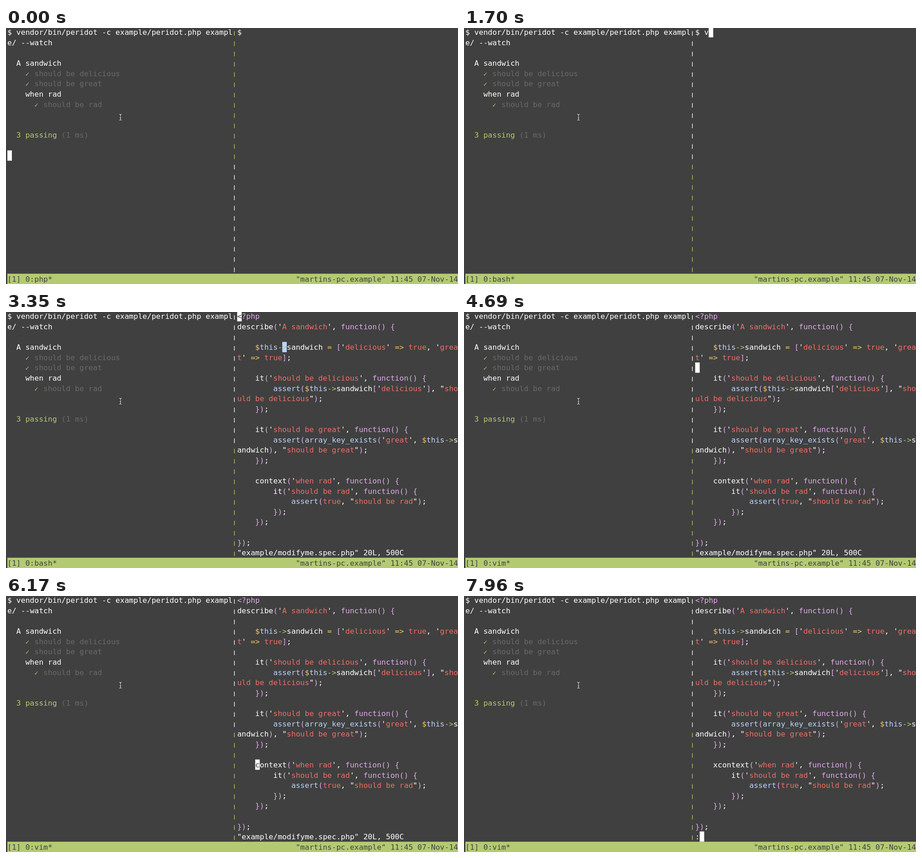
Recreate the animation shown at these times as an HTML page with a canvas. Size 995 by 563 pixels, loop 8000 ms.

```html
<!DOCTYPE html>
<html lang="en">
<head>
<meta charset="utf-8">
<title>Terminal</title>
<style>
html, body { margin: 0; width: 100%; height: 100%; overflow: hidden; background: #404040; }
canvas { display: block; }
</style>
</head>
<body>
<canvas id="stage" width="995" height="563"></canvas>
<script>
const ctx = document.getElementById('stage').getContext('2d');
const LOOP = 8000, CELL_W = 9.92, CELL_H = 22.6, LEFT = 3, PANE = 51, PANE_COLS = 49;
const BG = '#404040', WHITE = '#ffffff', GREY = '#696969', GREEN = '#b4ca72',
  RED = '#ee6d66', PINK = '#dfabe8', BLUE = '#bbd5fc', YELLOW = '#f6c762';
const FONT = '"DejaVu Sans Mono", "Liberation Mono", monospace';

const specCode = `<?php
describe('A sandwich', function() {

    $this->sandwich = ['delicious' => true, 'great' => true];

    it('should be delicious', function() {
        assert($this->sandwich['delicious'], "should be delicious");
    });

    it('should be great', function() {
        assert(array_key_exists('great', $this->sandwich), "should be great");
    });

    context('when rad', function() {
        it('should be rad', function() {
            assert(true, "should be rad");
        });
    });

});`;

// Each rule colours one kind of token; strings keep white quotes.
const rules = [
  [/^('[^']*'|"[^"]*")/, RED],
  [/^(<\?php|function|[()[\]{}])/, PINK],
  [/^->/, GREEN],
  [/^(=>?|\$)/, YELLOW],
  [/^(this|assert|array_key_exists)\b/, BLUE],
  [/^true\b/, RED],
  [/^(\w+|.)/, WHITE]
];

// Time, row and column of the text cursor.
const cursorSteps = [
  [0, 12, 0], [500, 0, 53], [1700, 0, 54], [1850, 0, 57], [2150, 0, 60], [2300, 0, 65],
  [2600, 0, 66], [2750, 0, 83], [3350, 0, 51], [3950, 1, 51], [4100, 2, 51],
  [4690, 5, 51], [4840, 7, 51], [4990, 10, 51], [5130, 12, 51], [5280, 15, 51], [5430, 16, 51],
  [5730, 16, 52], [5880, 16, 53], [6030, 16, 54], [6170, 16, 55], [7060, 16, 56], [7960, 23, 52]
];
const typedSteps = [
  [0, ''], [1700, 'v'], [1850, 'vim '], [2150, 'vim exa'], [2300, 'vim example/'],
  [2600, 'vim example/m'], [2750, 'vim example/modifyme.spec.php ']
];
const processSteps = [[0, 'php'], [1100, 'bash'], [3500, 'vim']];
const messageSteps = [
  [3350, '"example/modifyme.spec.php" 20L, 500C'], [6760, '-- INSERT --'], [7960, ':']
];

const current = (steps, t) => steps.filter(s => s[0] <= t).pop();
const cellX = col => LEFT + col * CELL_W;
const cellY = row => Math.max(0, row * CELL_H - 2);

let cursor;

function fillCell(row, col, color) {
  ctx.fillStyle = color;
  const y = cellY(row);
  ctx.fillRect(cellX(col), y, CELL_W, cellY(row + 1) - y);
}

function put(row, col, text, color = WHITE) {
  [...text].forEach((ch, i) => {
    const under = row === cursor[1] && col + i === cursor[2];
    ctx.fillStyle = under ? BG : color;
    ctx.font = `${ch === '✓' ? 14 : 16.477}px ${FONT}`;
    ctx.fillText(ch, cellX(col + i), 15.3 + row * CELL_H);
  });
}

function putCode(line, row) {
  let col = 0;
  const emit = (ch, color) => {
    put(row + Math.floor(col / PANE_COLS), PANE + col % PANE_COLS, ch, color);
    col++;
  };
  for (let rest = line; rest;) {
    const [pattern, color] = rules.find(([p]) => p.test(rest));
    const token = rest.match(pattern)[0];
    for (const ch of token) emit(ch, /['"]/.test(ch) ? WHITE : color);
    rest = rest.slice(token.length);
  }
  return row + Math.max(1, Math.ceil(line.length / PANE_COLS));
}

function drawReport() {
  put(0, 0, '$ vendor/bin/peridot -c example/peridot.php exampl');
  put(1, 0, 'e/ --watch');
  put(3, 2, 'A sandwich');
  [[4, 4, 'should be delicious'], [5, 4, 'should be great'], [7, 6, 'should be rad']]
    .forEach(([row, col, text]) => {
      put(row, col, '✓', GREEN);
      put(row, col + 2, text, GREY);
    });
  put(6, 4, 'when rad');
  put(10, 2, '3 passing', GREEN);
  put(10, 12, '(1 ms)', GREY);
}

function drawDivider(leftActive) {
  for (let row = 0; row < 24; row++) {
    ctx.fillStyle = (row < 13) === leftActive ? GREEN : WHITE;
    ctx.fillRect(502, 7 + row * CELL_H, 1.3, 10);
  }
}

function drawPointer() {
  const beam = new Path2D('M249 189.5Q252 189.5 252 192V200.5Q252 203 249 203M255 189.5Q252 189.5 252 192M252 200.5Q252 203 255 203M250.5 197.5H253.5');
  [['#222222', 2.6], ['#e8e8e8', 1.1]].forEach(([color, width]) => {
    ctx.strokeStyle = color;
    ctx.lineWidth = width;
    ctx.stroke(beam);
  });
}

function drawEditor(t) {
  if (t < 3950) fillCell(3, 61, BLUE);
  const code = t < 7060 ? specCode : specCode.replace('context', 'xcontext');
  code.split('\n').reduce((row, line) => putCode(line, row), 0);
  put(23, PANE, current(messageSteps, t)[1]);
}

function draw(t) {
  ctx.fillStyle = BG;
  ctx.fillRect(0, 0, 995, 563);
  cursor = current(cursorSteps, t);
  fillCell(cursor[1], cursor[2], WHITE);
  drawReport();
  drawDivider(t < 500);
  if (t < 3350) put(0, PANE, '$ ' + current(typedSteps, t)[1]);
  else drawEditor(t);
  ctx.fillStyle = GREEN;
  ctx.fillRect(LEFT, cellY(24), 992, CELL_H);
  put(24, 0, `[1] 0:${current(processSteps, t)[1]}*`, BG);
  put(24, 64, '"martins-pc.example" 11:45 07-Nov-14', BG);
  drawPointer();
}

function tick() {
  draw(performance.now() % LOOP);
  requestAnimationFrame(tick);
}
tick();
</script>
</body>
</html>
```
